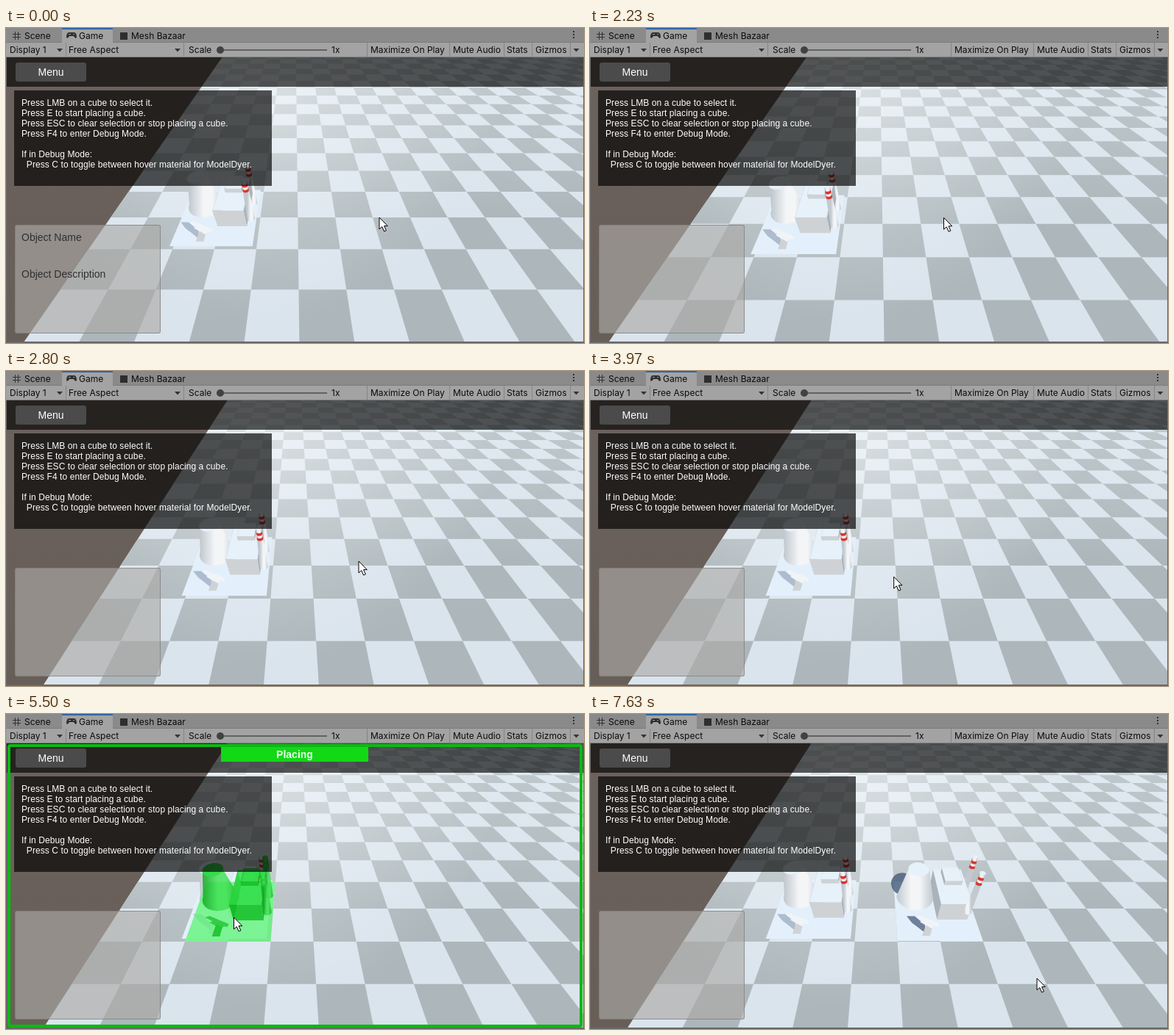
An HTML page with a canvas that plays this animation: 785 px wide and 429 px high, repeating every 8 s.

```html
<!DOCTYPE html>
<html lang="en">
<head>
<meta charset="utf-8">
<title>Placement demo</title>
<style>
html, body { margin: 0; width: 100%; height: 100%; overflow: hidden; background: #6b615c; }
#stage { position: relative; width: 785px; height: 429px; overflow: hidden; font: 12px/14px Inter, sans-serif; color: #0b0b0b; }
#stage * { position: absolute; box-sizing: border-box; white-space: pre; }
canvas, svg { left: 0; top: 0; }
.ui { font-family: "Liberation Sans", Arial, sans-serif; }
#bar { left: 1px; top: 40px; width: 783px; height: 40px; background: rgba(0,0,0,.65); }
#menu { left: 13px; top: 47px; width: 96px; height: 26px; border-radius: 3px; background: #4b4b4b; color: #fff; font-size: 14px; line-height: 26px; text-align: center; }
#help { left: 11px; top: 85px; width: 350px; height: 130px; padding: 10px; background: rgba(0,0,0,.67); color: #fff; letter-spacing: .085px; }
#info { left: 12px; top: 268px; width: 198px; height: 148px; border: 1px solid rgba(125,122,120,.7); border-radius: 3px; background: rgba(171,169,167,.64); }
#labels { left: 21px; top: 277px; color: #303030; font-size: 14px; line-height: 16px; }
#labels span + span { top: 50px; left: 0; }
#placing { inset: 0; }
#frame { left: 2px; top: 41px; width: 781px; height: 386px; border: 4px solid #0bb914; border-radius: 4px; }
#badge { left: 292px; top: 45px; width: 200px; height: 20px; background: #12d816; color: #f0fff0; font-weight: bold; font-size: 14px; line-height: 20px; text-align: center; }
</style>
</head>
<body>
<div id="stage">
  <canvas id="view" width="785" height="429"></canvas>
  <div class="ui">
    <div id="bar"></div>
    <div id="placing"><div id="frame"></div><div id="badge">Placing</div></div>
    <div id="menu">Menu</div>
    <div id="help">Press LMB on a cube to select it.
Press E to start placing a cube.
Press ESC to clear selection or stop placing a cube.
Press F4 to enter Debug Mode.

If in Debug Mode:
  Press C to toggle between hover material for ModelDyer.</div>
    <div id="info"></div>
    <div id="labels"><span>Object Name</span><span>Object Description</span></div>
  </div>
  <svg width="785" height="429">
    <path fill="#8a8a8a" d="M0 0h785v19H0z"/>
    <path fill="#a3a3a3" d="M76 0h69v19H76zM0 19h785v21H0z"/>
    <path fill="#2f65a8" d="M76 0h69v2H76z"/>
    <path fill="#7c7c7c" d="M0 19h76v1H0zM145 19h640v1H145zM0 39h785v1H0z"/>
    <path stroke="#858585" d="M81.500 20v19M241.500 20v19M490.500 20v19M602.500 20v19M676.500 20v19M714.500 20v19M766.500 20v19"/>
    <path stroke="#333" d="M12.500 5v11M16.500 5v11M9 8.500h11M9 12.500h11"/>
    <path fill="#2e2e2e" d="M85 6h8q3 1 3 7-2 2-4-2h-6q-2 4-4 2 0-6 3-7z"/>
    <path fill="#a3a3a3" d="M85 8h3v1h-3zM91 8h2v1h-2z"/>
    <path fill="#2e2e2e" d="M155 6h10v10h-10zM770 4h2v2h-2zM770 8h2v2h-2zM770 12h2v2h-2z"/>
    <path fill="#333" d="M69 28h8l-4 4.500zM229 28h8l-4 4.500zM770.500 28h8l-4 4.500z"/>
    <path fill="#626262" d="M291 29h145v2H291z"/>
    <circle cx="291" cy="30" r="5" fill="#424242"/>
    <path fill="#686868" d="M0 40h1v389H0zM784 40h1v389h-1zM0 427h785v2H0z"/>
  </svg>
  <span style="left:25px;top:4px">Scene</span>
  <span style="left:99px;top:4px">Game</span>
  <span style="left:170px;top:4px">Mesh Bazaar</span>
  <span style="left:5px;top:23px">Display 1</span>
  <span style="left:85px;top:23px">Free Aspect</span>
  <span style="left:248px;top:23px">Scale</span>
  <span style="left:442px;top:23px">1x</span>
  <span style="left:495px;top:23px">Maximize On Play</span>
  <span style="left:607px;top:23px">Mute Audio</span>
  <span style="left:680px;top:23px">Stats</span>
  <span style="left:719px;top:23px">Gizmos</span>
  <svg id="cursor" width="16" height="22" viewBox="-1 -1 16 22">
    <path d="M0 0V16L3.800 12.600 6.600 19 9.400 17.800 6.600 11.600H11.300Z" fill="#fff" stroke="#000"/>
  </svg>
</div>
<script>
const LOOP = 8000, PLACE_START = 4670, PLACE_END = 7170;
const $ = id => document.getElementById(id);
const ctx = $('view').getContext('2d');

// Pinhole camera over the floor, lengths in tiles
const FOCAL = 335, CX = 392, CY = 233.5, HEIGHT = 5, PITCH = Math.PI / 4;
const COS = Math.cos(PITCH), SIN = Math.sin(PITCH);
const TILE = COS / HEIGHT, HORIZON = CY - FOCAL * SIN / COS;
const DEPTH = COS * COS / (FOCAL * HEIGHT);

// time, x of the floor edge (as slope), distance of row 0
const camKeys = [[0, -.695, 8.32], [2130, -.695, 8.32], [2430, -.687, 7.48], [2800, -.645, 8.14]];
const mouseKeys = [
  [0, 507, 258], [30, 506, 258], [500, 486, 258], [1030, 486, 258], [1100, 481, 258],
  [2130, 481, 258], [2430, 479, 259], [3230, 479, 259], [3490, 146, 88], [3770, 629, 361],
  [4030, 380, 268], [4070, 379, 267], [4470, 189, 204], [4670, 189, 204], [4900, 207, 224],
  [5470, 309, 277], [6170, 397, 277], [6330, 398, 277], [7130, 470, 281], [7170, 471, 282], [7630, 607, 360]
];

const solid = {
  alpha: 1, base: '#e3f0fb', light: '#f3f5f7', dark: '#c2c9cf', lid: '#e6f1fa',
  front: '#cfd2d5', side: '#aab2ba', band: '#d8362f', prop: '#f1f4f6'
};
const ghost = {
  alpha: .82, base: '#66f57e', light: '#3fe052', dark: '#12a522', lid: '#2fdd45',
  front: '#13bd26', side: '#10a821', band: '#27c93a', prop: '#24c437'
};

let edge, row0;

function sample(keys, t) {
  let i = keys.length - 1;
  while (keys[i][0] > t) i--;
  const a = keys[i], b = keys[i + 1];
  if (!b) return a.slice(1);
  const p = (t - a[0]) / (b[0] - a[0]), e = p * p * (3 - 2 * p);
  return [1, 2].map(k => a[k] + (b[k] - a[k]) * e);
}

function project(col, row, h = 0) {
  const x = col + edge / TILE, z = row + row0 - HEIGHT * SIN / COS, drop = HEIGHT - h;
  const d = z * COS + drop * SIN;
  return [CX + FOCAL * x / d, CY + FOCAL * (drop * COS - z * SIN) / d];
}

function unproject(x, y) {
  const v = y - HORIZON;
  return [((x - CX) / v - edge) / TILE, 1 / (v * DEPTH) - row0];
}

function poly(pts, fill) {
  ctx.beginPath();
  pts.forEach(p => ctx.lineTo(p[0], p[1]));
  ctx.closePath();
  ctx.fillStyle = fill;
  ctx.fill();
}

function floor() {
  const sky = ctx.createLinearGradient(0, 40, 0, 427);
  sky.addColorStop(0, '#6c625d');
  sky.addColorStop(1, '#685e58');
  ctx.fillStyle = sky;
  ctx.fillRect(0, 40, 785, 387);

  const at = y => [CX + edge * (y - HORIZON), y];
  const area = [at(40), [785, 40], [785, 427], at(427)];
  poly(area, '#dae4ed');
  for (let r = -3; r < 26; r++) {
    for (let c = 0; c < 42; c++) {
      if ((r + c) & 1) poly([project(c, r), project(c + 1, r), project(c + 1, r + 1), project(c, r + 1)], '#adb7bb');
    }
  }
  const haze = ctx.createLinearGradient(0, 40, 0, 260);
  haze.addColorStop(0, 'rgba(240,247,250,.32)');
  haze.addColorStop(1, 'rgba(240,247,250,0)');
  poly(area, haze);
  const glow = ctx.createRadialGradient(340, 70, 0, 340, 70, 330);
  glow.addColorStop(0, 'rgba(252,255,255,.45)');
  glow.addColorStop(1, 'rgba(252,255,255,0)');
  poly(area, glow);
}

function factory(col, row, pal, shadow) {
  const at = (x, z, h) => project(col + x, row + z, h);

  const arc = (x, z, h, r, from) => Array.from({ length: 13 }, (_, i) => {
    const a = from + Math.PI * i / 12;
    return at(x + r * Math.cos(a), z + r * Math.sin(a), h);
  });

  function cylinder(x, z, h0, h1, r0, r1, light, dark, lid) {
    const low = arc(x, z, h0, r0, Math.PI), back = arc(x, z, h1, r1, 0);
    const g = ctx.createLinearGradient(low[0][0], 0, low[12][0], 0);
    g.addColorStop(0, dark);
    g.addColorStop(.4, light);
    g.addColorStop(.65, light);
    g.addColorStop(1, dark);
    poly([...low, ...back], g);
    if (lid) poly([...back, ...arc(x, z, h1, r1, Math.PI)], lid);
  }

  function box(x0, x1, z0, z1, h0, h1) {
    for (const x of [x0, x1]) poly([at(x, z0, h0), at(x, z1, h0), at(x, z1, h1), at(x, z0, h1)], pal.side);
    poly([at(x0, z0, h0), at(x1, z0, h0), at(x1, z0, h1), at(x0, z0, h1)], pal.front);
    poly([at(x0, z0, h1), at(x1, z0, h1), at(x1, z1, h1), at(x0, z1, h1)], pal.lid);
  }

  function chimney(z) {
    const cuts = [0, 1.02, 1.1, 1.175, 1.255, 1.347], r = h => .105 - .03 * h;
    for (let i = 0; i < 5; i++) {
      cylinder(1.86, z, cuts[i], cuts[i + 1], r(cuts[i]), r(cuts[i + 1]),
        i & 1 ? pal.band : pal.light, i & 1 ? pal.band : pal.dark, i === 4 && pal.lid);
    }
  }

  const tower = () => cylinder(.55, 1.42, 0, .99, .5, .253, pal.light, pal.dark, pal.lid);
  const block = () => {
    box(1.03, 1.78, .62, 1.85, 0, .6);
    box(1.22, 1.65, 1.25, 1.75, .6, .75);
  };

  function prop() {
    const [px, py] = at(.7, .14, 0), k = (py - HORIZON) / 404;
    const shape = (pts, fill) => poly(pts.map(p => [px + p[0] * k, py + p[1] * k]), fill);
    if (pal === solid) {
      const tone = `rgba(72,92,122,${shadow ? .75 : .35})`;
      shape([[-27, -27], [-16, -27], [-2, -15], [-2, -4], [-12, -12], [-20, -18]], tone);
    }
    shape([[-6, 0], [5, 0], [8, -12], [0, -17]], pal.front);
    shape([[-15, -26], [-9, -28], [17, -17], [15, -13], [8, -14]], pal.prop);
    shape([[-9, -19], [-5, -21], [10, -14], [7, -10]], pal.prop);
  }

  ctx.globalAlpha = pal.alpha;
  poly([at(0, 0, 0), at(2, 0, 0), at(2, 2, 0), at(0, 2, 0)], pal.base);
  if (shadow) {
    const [sx, sy] = at(.1, 1.75, 0);
    ctx.fillStyle = 'rgba(72,92,122,.8)';
    ctx.beginPath();
    ctx.ellipse(sx + 7, sy - 5, 16, 15, .5, 0, 7);
    ctx.fill();
  }
  const leftOfView = col + 1 + edge / TILE < 0;
  if (leftOfView) tower();
  chimney(1.46);
  block();
  if (!leftOfView) tower();
  chimney(.88);
  prop();
  ctx.globalAlpha = 1;
}

function draw(t) {
  [edge, row0] = sample(camKeys, t);
  const [mx, my] = sample(mouseKeys, t);
  const placing = t >= PLACE_START && t < PLACE_END;

  floor();
  factory(1.9, .08, solid, false);
  if (placing) {
    const [c, r] = unproject(mx, my);
    factory(Math.round(c - 1.1), Math.round(r - 1), ghost, false);
  }
  if (t >= PLACE_END) factory(5, .02, solid, true);

  $('placing').style.display = placing ? 'block' : 'none';
  $('labels').style.display = t < 1330 ? 'block' : 'none';
  $('cursor').style.transform = `translate(${mx - 1}px, ${my - 1}px)`;
}

const start = performance.now();
function tick() {
  draw((performance.now() - start) % LOOP);
  requestAnimationFrame(tick);
}
tick();
</script>
</body>
</html>
```
